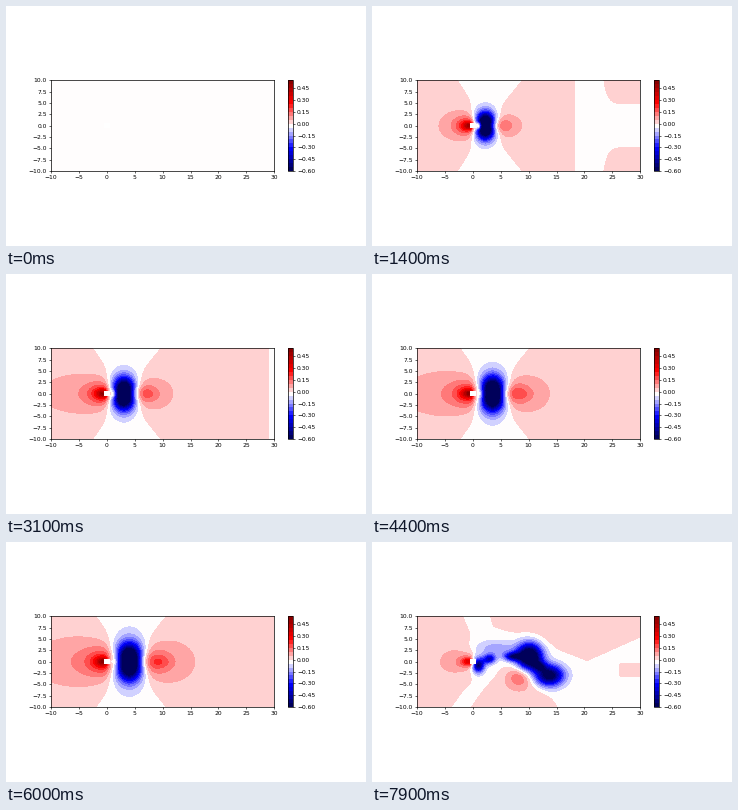
Recreate the animation shown at these times as a matplotlib script. Size 360 by 240 pixels, loop 8 s.

```python
import numpy as np
import matplotlib.pyplot as plt
from matplotlib.animation import FuncAnimation
from matplotlib.patches import Rectangle

W, H, FRAMES, STEP = 360, 240, 80, 100
PT = 0.72  # points per pixel at 100 dpi

plt.rcParams.update({"font.family": "DejaVu Sans", "font.size": 6 * PT,
                     "axes.linewidth": 0.7 * PT})
for tick in ("xtick", "ytick"):
    plt.rcParams.update({f"{tick}.major.width": 0.6 * PT,
                         f"{tick}.major.size": 2.1 * PT,
                         f"{tick}.major.pad": 2.1 * PT})

LEVELS = np.arange(-12, 12) * 0.05
X, Y = np.meshgrid(np.linspace(-10, 30, 241), np.linspace(-10, 10, 121))


def sigmoid(v):
    return 1 / (1 + np.exp(-np.clip(v, -50, 50)))


def smooth(t, a, b):
    u = np.clip((t - a) / (b - a), 0, 1)
    return u * u * (3 - 2 * u)


def gauss(x, y, sx, sy):
    return np.exp(-((X - x) / sx) ** 2 - ((Y - y) / sy) ** 2)


def largest(*parts):
    return np.maximum.reduce(parts)


def upstream(t):
    """Stagnation pressure in front of the body."""
    r2 = (X + 0.5) ** 2 + (1.5 * Y) ** 2
    nose = 0.42 / (1 + r2 / 1.44) * sigmoid(-4 * X)
    gain = 0.03 * smooth(t, 1.2, 3.0) * (1 - smooth(t, 7.1, 7.9))
    return nose + gain * np.exp(-Y ** 2 / 36) * sigmoid(-(X + 5) / 1.5)


def wake(t):
    """Symmetric bubble that spreads with the square root of time."""
    g = np.sqrt(t)
    xc = 0.6 + 1.4 * g
    size = 2.4 * (t / 6) ** 0.2
    dx2 = (X - xc) ** 2
    p = (0.6 + 1.2 * t) * (dx2 - 0.44 * Y ** 2) / (dx2 + Y ** 2 + 0.6 + 1.4 * t) ** 2
    p -= gauss(xc, 0, size, 1.5 * size)
    p += 0.025 * g * gauss(xc + 1.2 + 1.75 * g, 0, 2, 1.3)
    hole = gauss(0.8, 0, 0.6, 0.7)
    return p * (1 - hole) - 0.02 * hole


def start_wave(p, t):
    """Weak pressure front that leaves through the outlet."""
    edge = 10 + 6.3 * (t - 0.1)
    rim = 4.8 + 5.2 * np.exp(np.clip((edge + 5.3 - X) / 0.7, -50, 10))
    front = 0.02 * np.tanh(np.maximum(edge - X, np.abs(Y) - rim))
    m = sigmoid(2 * (X - edge + 2))
    return (1 - m) * p + m * front


def background(u):
    """Signed distance to the zero line, bent as the eddies move off."""
    first = largest(-X, X - (10.3 - 0.33 * Y + 0.036 * Y ** 2))
    roof = largest(10 - 4 * (X - 3.2), 9.5 - 0.45 * X, 0.55 * (X - 20))
    floor = -2 - 0.14 * (X - 7.5) ** 2
    outlet = np.minimum(X - 26.4, 1.35 - np.abs(Y + 1.85))
    last = largest(-1.2 - 0.02 * Y ** 2 + 0.1 * Y - X, Y - roof, floor - Y, outlet)
    d = (1 - u) * first + u * last
    return np.where(d > 0, 0.03, 0.015) * np.tanh(d / 2)


def eddy(t, side, born, rise):
    run = 7 * max(t - born, 0)
    return 4.2 + run, 0.9 * side + rise * run


def shedding(t):
    u = smooth(t, 7.2, 7.9)
    ax_, ay = eddy(t, 1, 7.05, 0.04)
    bx, by = eddy(t, -1, 6.54, -0.22)
    p = background(u)
    # eddies, the tail between them and the next one rolling up
    p -= 0.85 * gauss(ax_, ay, 2.2, 2.8)
    p -= 0.65 * gauss(bx, by, 2 + 0.5 * u, 2.3)
    p -= 0.3 * gauss((ax_ + bx) / 2, (ay + by) / 2, 1.1, 1)
    p -= 0.45 * gauss(ax_ - 3, ay - 1.2 * (1 - u), 1.5, 1)
    p -= 0.55 * gauss(1, -0.8, 1.1, 1.6)
    p -= 0.4 * u * gauss(3, 0.6, 1.1, 1.1)
    p -= 0.12 * u * gauss(ax_ - 6, ay + 1.8, 3.5, 1.9)
    # pressure ridges around them
    p += 0.14 * gauss(bx - 5.2, -3.2, 0.9 + 1.4 * u, 1.2 + 1.2 * u)
    p += (1 - u) * 0.06 * gauss(bx + 2.9, by + 3.6, 2, 1.5)
    p += (1 - u) * 0.13 * gauss(ax_ - 3.4, 2, 0.9, 1)
    return p


def pressure(t):
    if t == 0:
        return np.full_like(X, -0.01)
    w = smooth(t, 6.3, 7.1)
    p = upstream(t) + (1 - w) * wake(t) + w * shedding(t)
    return np.clip(start_wave(p, t), -0.599, 0.549)


def box(x, y, w, h):
    return fig.add_axes((x / W, 1 - (y + h) / H, w / W, h / H))


def contours(t):
    return ax.contourf(X, Y, pressure(t), levels=LEVELS, cmap="seismic")


fig = plt.figure(figsize=(3.6, 2.4), dpi=100, facecolor="white")
ax = box(45, 74.4, 223.2, 90.6)
cax = box(282.15, 74.4, 4.53, 90.6)
field = [contours(0)]
bar = fig.colorbar(field[0], cax=cax, ticks=np.arange(-4, 4) * 0.15)
bar.outline.set_linewidth(0.7 * PT)
ax.set(xlim=(-10, 30), ylim=(-10, 10),
       xticks=np.arange(-10, 31, 5), yticks=np.arange(-10, 10.1, 2.5))
ax.add_patch(Rectangle((-0.5, -0.5), 1, 1, fc="white", ec="none", zorder=2))


def update(i):
    field[0].remove()
    field[0] = contours(i * STEP / 1000)
    return field


anim = FuncAnimation(fig, update, frames=FRAMES, interval=STEP,
                     init_func=lambda: [], repeat=True, repeat_delay=0, blit=False)
plt.show()
```
